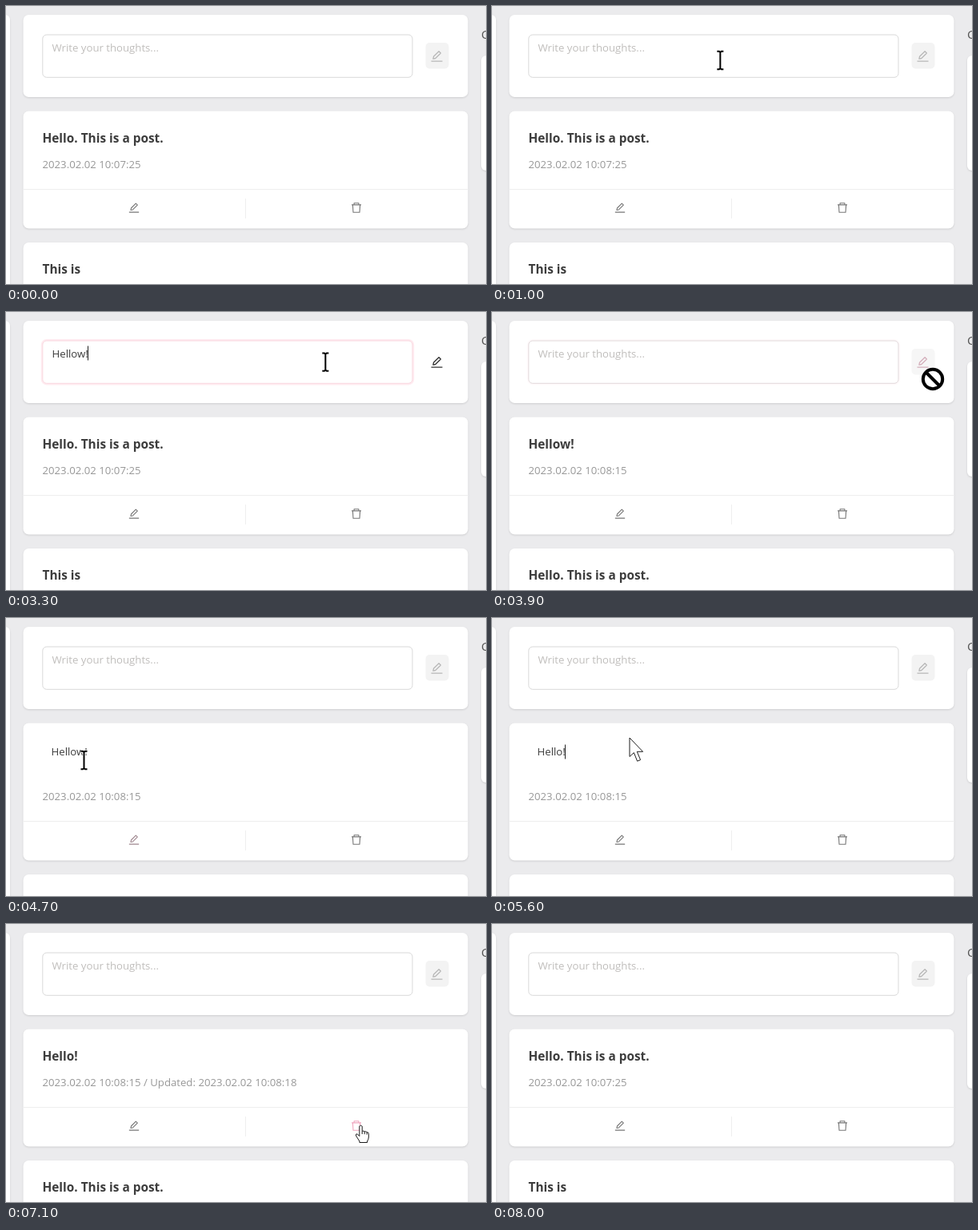
Recreate the animation shown at these times as an HTML page. Size 600 by 348 pixels, loop 8.2 s.

```html
<!DOCTYPE html>
<html lang="en">
<head>
<meta charset="utf-8">
<title>Post editor</title>
<style>
  html, body { margin: 0; width: 100%; height: 100%; overflow: hidden; background: #ebebed; }
  svg { display: block; width: 600px; height: 348px; }
  text { font: 13.2px "Open Sans", "Noto Sans", sans-serif; fill: #3c3c3c; white-space: pre; }
  .card { fill: #fff; filter: drop-shadow(0 1px 1px rgba(0, 0, 0, .12)); }
  .title { font-size: 15.4px; font-weight: 700; fill: #3d3d3d; }
  .date { fill: #989898; }
  .hint { fill: #c0bebc; }
  .rule { stroke: #eee; }
  .icon { fill: none; stroke: #777; stroke-linejoin: round; }
  .caret { stroke: #222; }
  .pointer { fill: #fff; stroke: #1c1c1c; stroke-width: 1; stroke-linejoin: round; }
</style>
</head>
<body>
<svg viewBox="0 0 600 348">
  <defs>
    <path id="pencil" d="M-4.6 3.6L-4 .8L2.6-5.8L4.9-3.5L-1.7 3ZM-7 6.6H7"/>
    <path id="bin" d="M-6-3.6H6M-2.9-3.6V-5.8H2.9V-3.6M-4.6-3.6L-4 5.8H4L4.6-3.6"/>
    <path id="beam" d="M-4-11.2H-1.4L0-10L1.4-11.2H4M0-10V10M-4 11.2H-1.4L0 10L1.4 11.2H4"/>
  </defs>

  <rect class="card" x="-20" y="11" width="25" height="400" rx="6"/>
  <rect class="card" x="594" y="62" width="40" height="144" rx="6"/>
  <text x="594" y="41" style="font-size:15px; fill:#555">C</text>

  <rect class="card" x="21.5" y="11" width="556" height="103" rx="7"/>
  <rect id="glow" x="44.7" y="34.9" width="464.5" height="55.5" rx="6" fill="none" stroke="#ffebf0" stroke-width="2"/>
  <rect id="field" x="45.8" y="36" width="462.2" height="53.3" rx="5" fill="#fff"/>
  <text id="hint" class="hint" x="57.5" y="56.5">Write your thoughts...</text>
  <text id="draft" x="57.5" y="56.5"></text>
  <path id="draftCaret" class="caret" d="M.5 42.5V60.5"/>
  <rect id="sendBack" x="524.5" y="46" width="29" height="32.5" rx="5" fill="#f3f3f3"/>
  <use id="send" class="icon" href="#pencil" transform="translate(538.5 62.5)" stroke-width="1.3"/>

  <rect id="post" class="card" x="21.5" y="131.5" width="556" height="147" rx="7"/>
  <text id="title" class="title" x="45.5" y="171"></text>
  <text id="edit" x="56.5" y="172"></text>
  <path id="editCaret" class="caret" d="M.5 158.5V176.5"/>
  <g id="lower">
    <text id="date" class="date" x="45.5" y="203"></text>
    <path class="rule" d="M21.5 229.5H577.5M299.5 241V266"/>
    <use id="pen" class="icon" href="#pencil" transform="translate(160 252.3) scale(.88)" stroke-width="1.25"/>
    <use id="trash" class="icon" href="#bin" transform="translate(438 252.5)" stroke-width="1.1"/>
    <rect class="card" x="21.5" y="296" width="556" height="100" rx="7"/>
    <text id="next" class="title" x="45.5" y="335"></text>
  </g>

  <g id="cursor">
    <path id="arrow" class="pointer" d="M0 0V23.5L5.4 18.6L9.6 29.2L13.6 27.6L9.3 17.3H16.6Z"/>
    <path id="hand" class="pointer" d="M-1.7 1.2Q0-1 1.7 1.2V7.5Q3.5 6.2 4.7 8Q6.6 7 7.6 8.8Q9.6 8.2 9.8 10.5V15Q9.6 18 8 20V21.5H-1.6V20L-6 13Q-6.6 10.5-4.4 10.8L-1.7 13.6ZM1.7 7.5V11M4.7 8V11.2M7.6 8.8V11.6"/>
    <g id="text" fill="none">
      <use href="#beam" stroke="#fff" stroke-width="4"/>
      <use href="#beam" stroke="#000" stroke-width="2"/>
    </g>
    <g id="banned" fill="none">
      <path d="M-9-9L9 9" stroke="#000" stroke-width="4"/>
      <circle r="12.2" stroke="#000" stroke-width="4"/>
    </g>
  </g>
</svg>

<script>
const LOOP = 8200, TICK = 100;
const $ = id => document.getElementById(id);

// Stepped tracks: [time, value]
const FIRST = "Hello. This is a post.";
const DAY = "2023.02.02 ";
const tracks = {
  draft: [[0, ""], [1700, "H"], [2000, "He"], [2100, "Hel"], [2200, "Hell"],
    [2400, "Hello"], [2500, "Hellow"], [2700, "Hellow!"], [3700, ""]],
  edit: [[0, ""], [4600, "Hellow!"], [5300, "Hellow"], [5400, "Hello"], [5600, "Hello!"], [6500, ""]],
  title: [[0, FIRST], [3700, "Hellow!"], [4600, ""], [6500, "Hello!"], [7600, FIRST]],
  next: [[0, "This is"], [3700, FIRST], [7600, "This is"]],
  date: [[0, DAY + "10:07:25"], [3700, DAY + "10:08:15"],
    [6200, `${DAY}19:08:18 / Updated: ${DAY}19:08:18`],
    [6500, `${DAY}10:08:15 / Updated: ${DAY}10:08:18`], [7600, DAY + "10:07:25"]]
};

// Pointer path: [time, shape, x, y]; an empty shape hides it
const path = [
  [0, ""], [700, "arrow", 486, 99], [800, "text", 420, 80], [1100, "text", 218, 62],
  [3100, "text", 218, 62], [3400, "text", 490, 63], [3500, "hand", 538, 64],
  [3700, "banned", 540, 66], [3900, "banned", 551, 84], [4000, "arrow", 552, 88],
  [4400, "hand", 160, 254], [4500, "hand", 160, 254], [4700, "text", 97.5, 178],
  [5000, "text", 117, 178], [5100, "text", 117, 178], [5300, "arrow", 175, 118],
  [5600, "arrow", 172, 150], [5700, "arrow", 172, 150], [6000, "arrow", 162.5, 270],
  [6400, "arrow", 162.5, 270], [6500, "arrow", 167, 310], [6600, ""],
  [6900, "arrow", 370, 325], [7100, "hand", 443.5, 252], [7800, ""]
];
const shapes = ["arrow", "hand", "text", "banned"];

const GREY = [119, 119, 119], PALE = [184, 184, 184], DARK = [48, 48, 48];
const PINK = [240, 166, 190], LINE = [217, 217, 217], FOCUS = [249, 214, 222];

const indexAt = (track, t) => track.findLastIndex(key => key[0] <= t);
const ramp = (t, from, to) => Math.min(1, Math.max(0, (t - from) / (to - from)));
const pulse = (t, a, b, c, d) => ramp(t, a, b) - ramp(t, c, d);
const mix = (a, b, k) => a.map((v, i) => v + (b[i] - v) * k);
const tint = (id, rgb) => { $(id).style.stroke = `rgb(${rgb.map(Math.round)})`; };
const show = (id, on) => { $(id).style.display = on ? "" : "none"; };
const move = (id, x, y) => $(id).setAttribute("transform", `translate(${x} ${y})`);

function drawCaret(id, field, on) {
  show(id, on);
  const el = $(field);
  const width = el.textContent ? el.getComputedTextLength() : 0;
  move(id, Math.round(+el.getAttribute("x") + width - .5), 0);
}

function drawCursor(t) {
  const i = indexAt(path, t);
  const [start, shape, x, y] = path[i];
  shapes.forEach(name => show(name, name === shape));
  if (!shape) return;
  const [end, nextShape, nextX, nextY] = path[i + 1];
  const k = nextShape ? ramp(t, start, end) : 0;
  move("cursor", k ? x + (nextX - x) * k : x, k ? y + (nextY - y) * k : y);
}

function draw(t) {
  for (const id in tracks) {
    const value = tracks[id][indexAt(tracks[id], t)][1];
    if ($(id).textContent !== value) $(id).textContent = value;
  }
  show("hint", t < 1700 || t >= 3700);
  drawCaret("draftCaret", "draft", t >= 1500 && t < 3700);
  drawCaret("editCaret", "edit", t >= 5200 && t < 6000);

  const growth = t >= 4600 && t < 6500 ? 25 : 0;
  $("post").setAttribute("height", 147 + growth);
  move("lower", 0, growth);

  const focus = pulse(t, 1000, 1200, 3600, 4000);
  $("glow").style.opacity = focus;
  tint("field", mix(LINE, FOCUS, focus));

  const active = pulse(t, 1600, 1900, 3600, 4000);
  $("sendBack").style.opacity = 1 - active;
  tint("send", mix(mix(PALE, DARK, t < 3700 ? active : 0), PINK, pulse(t, 3400, 3500, 3800, 4000)));
  tint("pen", mix(GREY, PINK, pulse(t, 4300, 4400, 4500, 4800) + pulse(t, 5900, 6000, 6400, 6600)));
  tint("trash", mix(GREY, PINK, pulse(t, 7000, 7100, 7700, 8000)));
  drawCursor(t);
}

const origin = performance.now();
function frame() {
  const t = (performance.now() - origin) % LOOP;
  draw(Math.floor(t / TICK) * TICK);
  requestAnimationFrame(frame);
}
frame();
</script>
</body>
</html>
```
